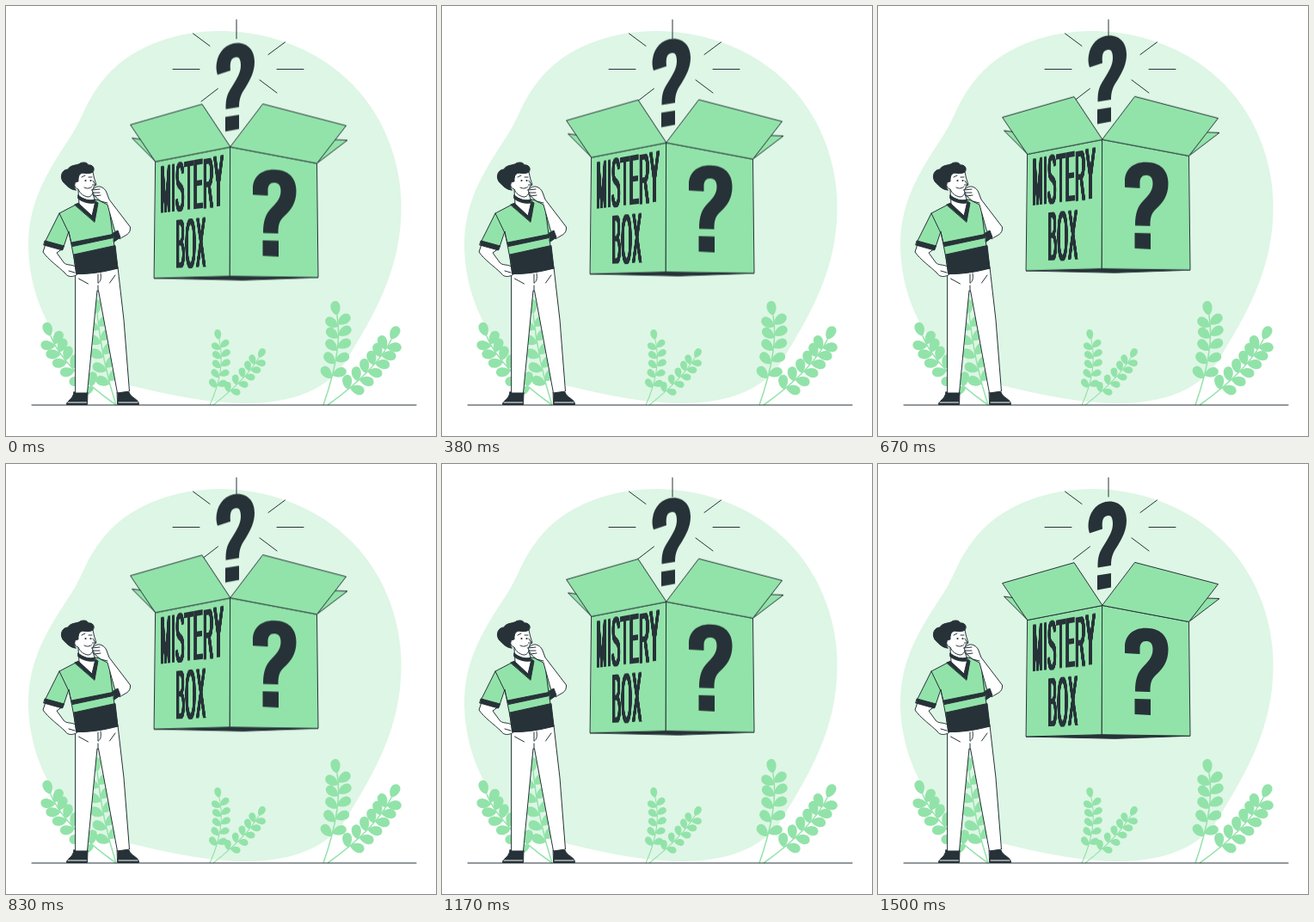
An HTML page that plays this animation: 500x500 px, repeating every 1540 ms.

```html
<!DOCTYPE html>
<html lang="en">
<head>
<meta charset="utf-8">
<title>Box</title>
<style>
  html, body { margin: 0; width: 100%; height: 100%; overflow: hidden; background: #fff; }
  .stage { position: relative; width: 500px; height: 500px; overflow: hidden; }
  svg { position: absolute; left: 0; top: 0; }
  .ink { fill: #263238; }
  .green { fill: #92e3a9; }
  .white { fill: #fff; }
  .line { stroke: #263238; stroke-width: 1; stroke-linejoin: round; stroke-linecap: round; }
  .open { fill: none; }
  .box { position: absolute; inset: 0; animation: float 1540ms linear -40ms infinite; }
  @keyframes float { 50% { transform: translateY(-10px); } }
  /* lettering laid on the left side of the box in perspective */
  .side {
    position: absolute; left: 173px; top: 181px; width: 440px; height: 135px;
    transform-origin: 0 0;
    transform: matrix3d(.18, -.03477, 0, -.000227, 0, 1, 0, 0, 0, 0, 1, 0, 0, 0, 0, 1);
    font: 77px/63.5px "Liberation Sans", Arial, sans-serif;
    letter-spacing: 4px; white-space: nowrap; color: #263238;
    text-shadow: 2.5px 0, -2.5px 0, 5px 0, -5px 0;
  }
  .side span { position: absolute; left: 37px; top: 3px; }
  .side span + span { left: 134px; top: 66.5px; }
</style>
</head>
<body>
<div class="stage">
  <svg width="500" height="500" viewBox="0 0 500 500">
    <path fill="#def6e5" d="M250 29C330 30 400 70 434 133C462 185 465 240 453 290C442 335 420 372 400 405C378 447 330 463 275 462C225 461 170 448 120 435C70 420 25 350 26 275C27 225 50 190 75 152C92 126 92 110 118 80C150 45 200 29 250 29Z"/>
    <g id="plants" class="green"></g>
    <path class="line open" d="M30 464H477"/>
    <path class="line open" d="M268 16V38M217.500 32L237 46.500M324.500 42L305 56.500M194 73.500H225M315 73.500H346M246.500 96L227 111M295 86L315 101"/>

    <g class="man line">
      <!-- shoes and trousers -->
      <path class="ink" d="M79 449H95L94.500 463.500H70.500C70 459 78 458 79 449Z"/>
      <path class="ink" d="M129.500 449H143C145 456 155 457 154.500 463.500H130Z"/>
      <path class="open" style="stroke:#fff" d="M72 461H93.500M131 461H153"/>
      <path class="white" d="M81 309L130 304L137 365L143.500 448L129.500 450L107.500 331L106 331L94.500 450H81Z"/>
      <path class="open" d="M84.500 317L95.500 323M127 313L120.500 322M107 312V322M110 311C111 317 110 320 107.500 322M107 325V331"/>

      <!-- bent arm on the hip -->
      <path class="white" d="M46 277L43 286C49 295 61 303 69 311C72 316 79 315 83 312L81 303C75 300 70 302 67 298L59 287L66 282Z"/>
      <path class="open" d="M73 308L80 310"/>

      <!-- shirt -->
      <path class="green" d="M83 230L62 241L45 275L66 283L73 262L79 293L82 311.500L130 305L125 272L132 262L121 229L104 225Z"/>
      <path class="ink" d="M45.500 273L67.500 279L65.500 284L44 278Z"/>
      <path class="ink" d="M76.500 275L124 265.500L124.500 269.500L77.500 279.500Z"/>
      <path class="ink" d="M79 289L127 278.500L130 305C115 309 98 312 82 311.500Z"/>
      <path class="ink" d="M80 231L85 229L100 244L104 227L107 229L103 251Z"/>
      <path class="open" d="M62 241L73 264L77 279M120 235L124 266"/>

      <!-- neck and head -->
      <path class="white" d="M84 214L85 230L100 244L104 227L101 219Z"/>
      <path class="ink" d="M84 220C90 225 97 227 103 225L103 229C96 230 89 228 84 224Z"/>
      <path class="white" d="M83 199C86 193 94 192 101 193L102.500 200L105 208L102 210C102 217 100 222 95 222C90 221 86 218 84 213C79 212 78 205 83 204Z"/>
      <path class="ink" d="M81 214C74 214 68 206 66 204C62 197 66 190 72 190C75 184 83 186 87 182.500C92 181 96 183 95 185C101 184 104 189 101 193C97 196 91 194 87 194C84 197 84 201 84 204C79 203 78 209 81 214Z"/>
      <path class="open" d="M88 199L92 197M96 199L100 199M101 203L104 208L100.500 208M91 211C94 213 98 212 100 210"/>
      <g class="ink" stroke="none"><circle cx="92.500" cy="203" r="1.100"/><circle cx="98.500" cy="203" r="1.100"/></g>

      <!-- arm at the chin -->
      <path class="white" d="M104 211C108 208 115 211 117 217L120 225L144.500 257C145 266 139 266 132 271L126 260L118 231L110 227L103 221L100 214Z"/>
      <path class="open" d="M100 214L109 213M101 217L109 217M103 221L110 220M110 227L118 229"/>
      <path class="ink" d="M124.500 264L130 261L133 269L126 274Z"/>
    </g>
  </svg>

  <div class="box">
    <svg width="500" height="500" viewBox="0 0 500 500">
      <g class="line green">
        <path d="M174 181.500L146.500 154L160 156ZM361.500 183.500L397 156.500L382 156Z"/>
        <path class="ink" d="M172.500 317L260.500 314.500L363 316.200L276 319.300Z"/>
        <path d="M174 181.500L261 164.500L260.500 314.700L172.500 317Z"/>
        <path d="M261 164.500L361.500 183.500L363 316.200L260.500 314.700Z"/>
        <path d="M145 138.500L228 114.700L261 164.500L174 181.500Z"/>
        <path d="M299 114.500L395.500 139.700L361.500 183.500L261 164.500Z"/>
      </g>
      <g class="ink">
        <path d="M287 220V213C287 199 297 190.500 312 190.800C328 191 337.500 200 337.500 215.500C337.500 230 331 238 324 244.500C318 250 316.500 254 316.500 265L299 264.500C299 250 302 242 309 235C316 228 319.500 223 319.500 215.500C319.500 209.500 317 206 312.500 206C307 205.500 304.500 209 304.500 215V221ZM298.500 273L317 273.500V292L298.500 291Z"/>
        <path d="M246 80.500C244 74 244.500 70 245 66.500C247 53.500 256 44 269 43.500C282 43.500 289 53 289 65.500C289 77 284 86 279 94.500C274 102 271 107 271 118L255.500 120.500C255.500 108 257 103 263 94C269 84 273 78 273 69.500C273 62.500 271 59.500 267.500 60C262 60.500 260 65 261 75.500ZM255 129.500L271 127V143.500L255 146.500Z"/>
      </g>
    </svg>
    <div class="side"><span>MISTERY</span><span>BOX</span></div>
  </div>
</div>
<script>
  const plants = document.getElementById('plants');

  function add(d, attrs) {
    const path = document.createElementNS('http://www.w3.org/2000/svg', 'path');
    path.setAttribute('d', d);
    for (const key in attrs) path.setAttribute(key, attrs[key]);
    plants.append(path);
  }

  function leaf(x, y, angle, size) {
    add('M0 0C.2-.33.65-.42.88-.25C1.05-.1 1.05.12.88.25C.65.4.25.3 0 0Z', {
      transform: `translate(${x} ${y}) rotate(${angle}) scale(${size})`
    });
  }

  // A curved stem from tip to root with leaves in pairs
  function sprig(tip, bend, root, pairs, size) {
    const at = (t, i) => (1 - t) ** 2 * tip[i] + 2 * t * (1 - t) * bend[i] + t * t * root[i];
    const heading = t => {
      const [dx, dy] = [0, 1].map(i => (1 - t) * (tip[i] - bend[i]) + t * (bend[i] - root[i]));
      return Math.atan2(dy, dx) * 180 / Math.PI;
    };
    add(`M${tip}Q${bend} ${root}`, { fill: 'none', stroke: '#92e3a9', 'stroke-width': size / 11 });
    leaf(tip[0], tip[1], heading(0), size);
    for (let k = 0; k < pairs; k++) {
      for (const side of [-1, 1]) {
        const t = 0.13 + 0.74 * (k + (side < 0 ? 0.2 : 0)) / pairs;
        leaf(at(t, 0), at(t, 1), heading(t) + side * 55, size);
      }
    }
  }

  sprig([52, 384], [66, 420], [128, 464], 6, 17);
  sprig([106, 358], [112, 415], [128, 464], 5, 17);
  sprig([248, 388], [256, 422], [237, 464], 5, 12);
  sprig([294, 409], [280, 433], [241, 464], 5, 12);
  sprig([385, 360], [392, 398], [369, 464], 5, 17);
  sprig([448, 388], [430, 424], [374, 464], 6, 17);
</script>
</body>
</html>
```
